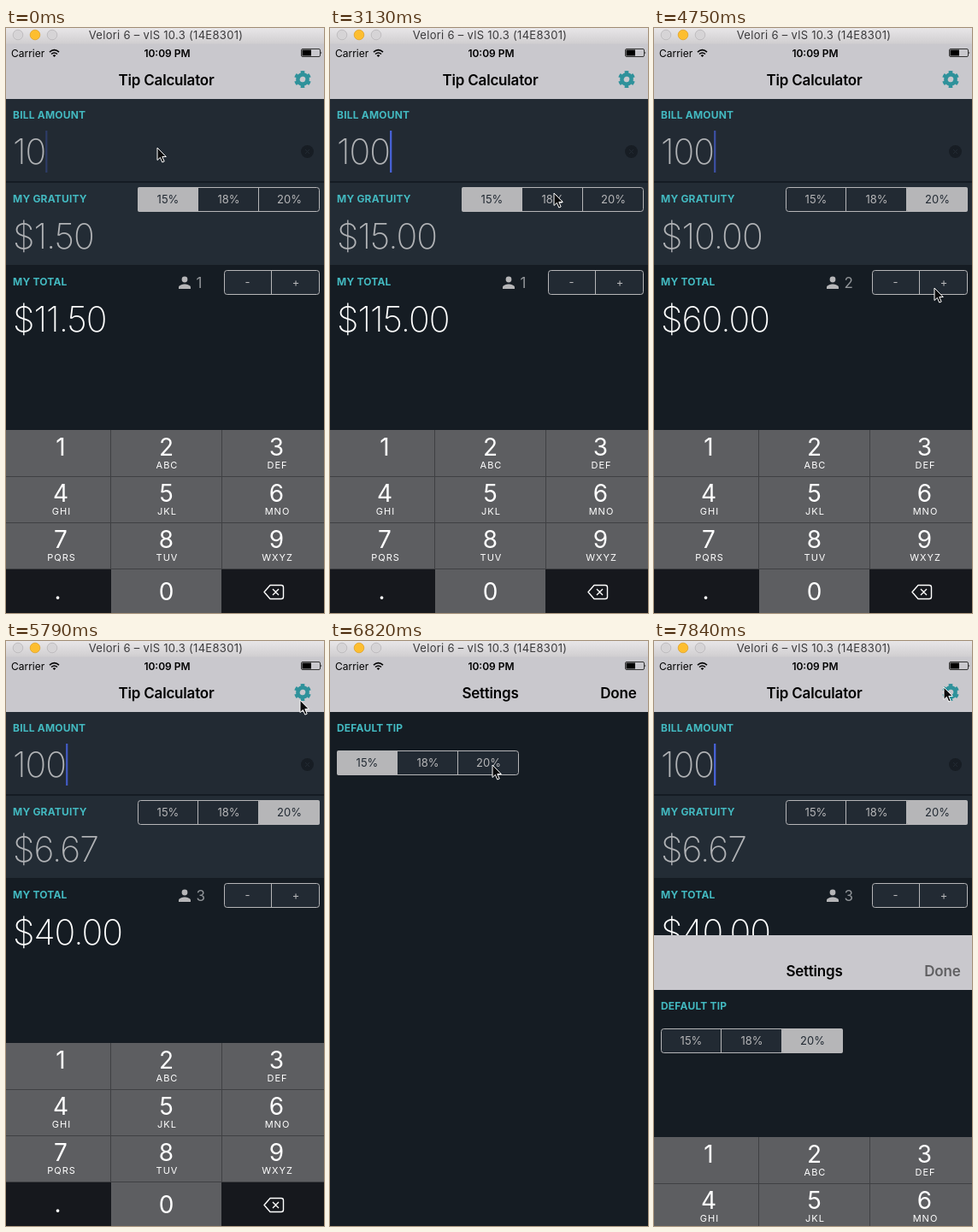
Recreate the animation shown at these times as an HTML page. Size 372 by 684 pixels, loop 7990 ms.

```html
<!DOCTYPE html>
<html lang="en">
<head>
<meta charset="utf-8">
<title>Tip Calculator</title>
<style>
  html, body { margin: 0; width: 100%; height: 100%; overflow: hidden; background: #151c23; }
  svg { display: block; width: 100%; height: 100%; }
  text { font-family: Inter, "Open Sans", sans-serif; font-size: 13px; white-space: pre; }
  .mid { text-anchor: middle; }
  .window { fill: #3b3a3c; letter-spacing: .3px; }
  .status { font-size: 12px; }
  .bold { font-weight: 600; }
  .title { font-size: 17px; font-weight: 600; letter-spacing: -.2px; }
  .label { font-size: 12px; font-weight: 700; letter-spacing: .2px; fill: #43b9c0; }
  .amount { font-size: 41px; font-weight: 200; letter-spacing: -1px; fill: #b0b2b5; }
  .total { fill: #fff; }
  .soft { fill: #b6b6b8; }
  .count { font-size: 17px; fill: #92969a; }
  .control { fill: #222a33; }
  .frame { fill: none; stroke: #b6b6b8; }
  .nav { fill: #c9c8cd; }
  .digit { font-size: 28px; fill: #fff; }
  .letters { font-size: 11px; letter-spacing: 1px; fill: #fff; }
</style>
</head>
<body>
<svg viewBox="0 0 372 684">
  <defs>
    <linearGradient id="chrome" x2="0" y2="1">
      <stop stop-color="#e8e6e8"/><stop offset="1" stop-color="#d0ced0"/>
    </linearGradient>
  </defs>

  <g id="calculator">
    <rect width="372" height="684" fill="#151c23"/>
    <rect y="83" width="372" height="96" fill="#222a33"/>
    <rect y="181" width="372" height="96" fill="#232c35"/>
    <rect class="nav" y="18" width="372" height="65"/>
    <text class="title mid" x="187.5" y="67">Tip Calculator</text>
    <g id="gear" transform="translate(347 60) rotate(15)" fill="none" stroke="#2f929b">
      <circle r="5.6" stroke-width="4.6"/>
      <circle r="8.3" stroke-width="3.4" pathLength="60" stroke-dasharray="5 5"/>
    </g>

    <text class="label" x="8" y="106">BILL AMOUNT</text>
    <text class="amount" id="bill" x="8" y="159"/>
    <rect id="caret" y="120" width="2.2" height="49" fill="#4964dc"/>
    <circle cx="352.5" cy="144.5" r="7.5" fill="#171d24"/>
    <path d="M350 142l5 5m0-5l-5 5" stroke="#222a33"/>

    <text class="label" x="8" y="204">MY GRATUITY</text>
    <text class="amount" id="gratuity" x="8" y="258"/>
    <g id="tipPicker" transform="translate(154 186)"></g>

    <text class="label" x="8" y="301">MY TOTAL</text>
    <text class="amount total" id="total" x="8" y="355"/>
    <g class="soft">
      <circle cx="209" cy="294" r="3.4"/>
      <path d="M202 305v-1.800c0-2.700 4.500-3.800 7-3.800s7 1.100 7 3.800v1.800z"/>
    </g>
    <text class="count" id="people" x="222.500" y="304"/>
    <rect class="control" x="255.500" y="283.500" width="111" height="28" rx="3"/>
    <rect class="frame" x="255.500" y="283.500" width="111" height="28" rx="3"/>
    <path class="frame" d="M310.500 283.500v28"/>
    <text class="soft mid" x="282.500" y="302">-</text>
    <text class="soft mid" x="339" y="302">+</text>
  </g>

  <g id="settings">
    <rect y="19" width="372" height="665" fill="#151c23"/>
    <rect class="nav" y="19" width="372" height="64"/>
    <text class="title mid" x="187.500" y="67">Settings</text>
    <text class="title" id="done" x="358.500" y="67" text-anchor="end">Done</text>
    <text class="label" x="8" y="106">DEFAULT TIP</text>
    <g id="defaultPicker" transform="translate(8 128)"></g>
  </g>

  <g id="keyboard">
    <rect y="470" width="372" height="214" fill="#5d5e61"/>
    <path d="M0 632h123v52H0zM252 632h120v52H252z" fill="#16181d"/>
    <path d="M122.500 470V632M252.500 470V632M0 524.500H372M0 578.500H372M0 632.500H372" stroke="#3f4043"/>
    <g id="keys"></g>
    <path d="M309 651.500h13a2.500 2.500 0 0 1 2.500 2.500v11a2.500 2.500 0 0 1-2.500 2.500h-13l-7-8zM312 656l7 7m0-7l-7 7"
      fill="none" stroke="#fff" stroke-width="1.400" stroke-linejoin="round"/>
  </g>

  <g id="statusBar">
    <rect width="372" height="18.500" fill="url(#chrome)"/>
    <g stroke-width=".8">
      <circle cx="14" cy="8" r="5.800" fill="#d6d4d6" stroke="#b9b7b9"/>
      <circle cx="34" cy="8" r="5.800" fill="#fdbe30" stroke="#e0a32a"/>
      <circle cx="54" cy="8" r="5.800" fill="#d6d4d6" stroke="#b9b7b9"/>
    </g>
    <text class="window mid" x="187" y="13">Velori 6 – vlS 10.3 (14E8301)</text>
    <text class="status" x="6" y="33.500">Carrier</text>
    <path d="M51 28.200q5.500-5 11 0M53 30.500q3.500-3 7 0" fill="none" stroke="#000" stroke-width="1.600"/>
    <path d="M54.600 32q1.900-1.600 3.800 0l-1.900 2z"/>
    <text class="status bold mid" x="188.500" y="33.500">10:09 PM</text>
    <rect x="345.500" y="24.500" width="22" height="9" rx="1.500" fill="none" stroke="#333"/>
    <rect x="346.500" y="25.500" width="10.500" height="7"/>
    <path d="M368.500 27.500q1.600 1.500 0 3z"/>
  </g>

  <path id="pointer" d="M0 0V14.500L3.400 11.400L5.800 17L8.200 16L5.800 10.500H10.300Z" fill="#0b0b0c" stroke="#fff" stroke-width="1"/>
</svg>

<script>
const LOOP = 7990, STEP = 148, LAST_STEP = 53;
const TIPS = [15, 18, 20];
const PRESENT = 5879, DISMISS = 7734.5, KEYBOARD_LEAD = 9;

// [time, value] pairs: each value holds until the next one.
const BILL = [[0, 10], [290, 100], [440, 1000], [2600, 100]];
const TIP = [[0, 0], [3250, 1], [3990, 2]];
const DEFAULT_TIP = [[0, 0], [6950, 2]];
const PEOPLE = [[0, 1], [4700, 2], [5000, 3]];

// Pointer waypoints: [time, x, y]
const PATH = [
  [0, 177, 140], [1100, 177, 140], [1620, 260, 186], [1850, 260, 186], [2200, 262, 193],
  [3270, 262, 193], [3830, 328, 199], [4250, 328, 199], [4580, 328, 304], [5200, 328, 304],
  [5780, 344, 69], [6400, 344, 69], [6800, 190, 145], [7060, 190, 145], [7540, 339, 54]
];

const $ = id => document.getElementById(id);
const money = new Intl.NumberFormat('en-US', { style: 'currency', currency: 'USD' });
const clamp = v => Math.max(0, Math.min(1, v));
const valueAt = (steps, t) => steps.filter(s => s[0] <= t).pop()[1];
const label = (x, y, cls, str) => `<text class="${cls}" x="${x}" y="${y}">${str}</text>`;
const slide = (id, y) => $(id).setAttribute('transform', `translate(0 ${Math.round(y)})`);

function buildPicker(id) {
  $(id).innerHTML = '<rect class="control" x=".5" y=".5" width="212" height="28" rx="3"/>' +
    '<rect class="soft selection" width="71" height="29" rx="2"/>' +
    '<rect class="frame" x=".5" y=".5" width="212" height="28" rx="3"/>' +
    '<path class="frame" d="M70.5 .5v28M141.5 .5v28"/>' +
    TIPS.map((tip, i) => label(35.5 + 71 * i, 19, 'mid', tip + '%')).join('');
}

function selectTip(id, index) {
  $(id).querySelector('.selection').setAttribute('x', index * 71);
  $(id).querySelectorAll('text').forEach((el, i) => {
    el.setAttribute('fill', i === index ? '#222a33' : '#b6b6b8');
  });
}

function buildKeys() {
  const letters = ['', 'ABC', 'DEF', 'GHI', 'JKL', 'MNO', 'PQRS', 'TUV', 'WXYZ'];
  const columns = [64, 187.5, 316.5];
  $('keys').innerHTML = letters.map((str, i) => {
    const x = columns[i % 3], y = 500 + 54 * Math.floor(i / 3);
    return label(x, y, 'digit mid', i + 1) + label(x + 1, y + 15, 'letters mid', str);
  }).join('') + label(60.5, 668, 'digit mid', '.') + label(187.5, 669, 'digit mid', '0');
}

// Critically damped spring from 0 to 1
function spring(ms) {
  const x = Math.max(0, ms) * 0.015;
  return 1 - (1 + x) * Math.exp(-x);
}

function caretOpacity(t) {
  if (t < 140) return 0.3;
  if (t < 440 || t >= DISMISS) return 1;
  const age = t - (t < 2600 ? 385 : 2600);
  const phase = age % 1000;
  const fadeIn = age < 1000 ? 1 : clamp(phase / 200);
  const blink = Math.min(fadeIn, clamp((800 - phase) / 200));
  return blink * clamp((6110 - t) / 160);
}

function pointerAt(t) {
  const next = PATH.findIndex(p => p[0] > t);
  if (next < 0) return PATH[PATH.length - 1].slice(1);
  const [t0, x0, y0] = PATH[next - 1], [t1, x1, y1] = PATH[next];
  const u = (t - t0) / (t1 - t0), e = u * u * (3 - 2 * u);
  return [x0 + (x1 - x0) * e, y0 + (y1 - y0) * e];
}

function render(t) {
  const bill = valueAt(BILL, t), tip = valueAt(TIP, t), people = valueAt(PEOPLE, t);
  const gratuity = bill * TIPS[tip] / 100;
  $('bill').textContent = bill;
  $('gratuity').textContent = money.format(gratuity / people);
  $('total').textContent = money.format((bill + gratuity) / people);
  $('people').textContent = people;
  selectTip('tipPicker', tip);
  selectTip('defaultPicker', valueAt(DEFAULT_TIP, t));

  $('caret').setAttribute('x', 46.2 + 23.9 * (String(bill).length - 2));
  $('caret').setAttribute('opacity', caretOpacity(t));

  const leaving = spring(t - DISMISS);
  slide('settings', 665 * (1 - spring(t - PRESENT) + leaving));
  slide('keyboard', 216 * (spring(t - PRESENT + KEYBOARD_LEAD) - leaving));
  $('gear').setAttribute('opacity', t > 5850 && t < 6250 ? 0.65 : 1);
  $('done').setAttribute('opacity', t > DISMISS ? 0.52 : 1);
  $('pointer').setAttribute('transform', `translate(${pointerAt(t)})`);
}

buildPicker('tipPicker');
buildPicker('defaultPicker');
buildKeys();

// The screen refreshes in coarse, even steps.
const start = performance.now();
function tick() {
  const t = (performance.now() - start) % LOOP;
  render(Math.min(LAST_STEP, Math.floor((t + 10) / STEP)) * STEP);
  requestAnimationFrame(tick);
}
tick();
</script>
</body>
</html>
```
